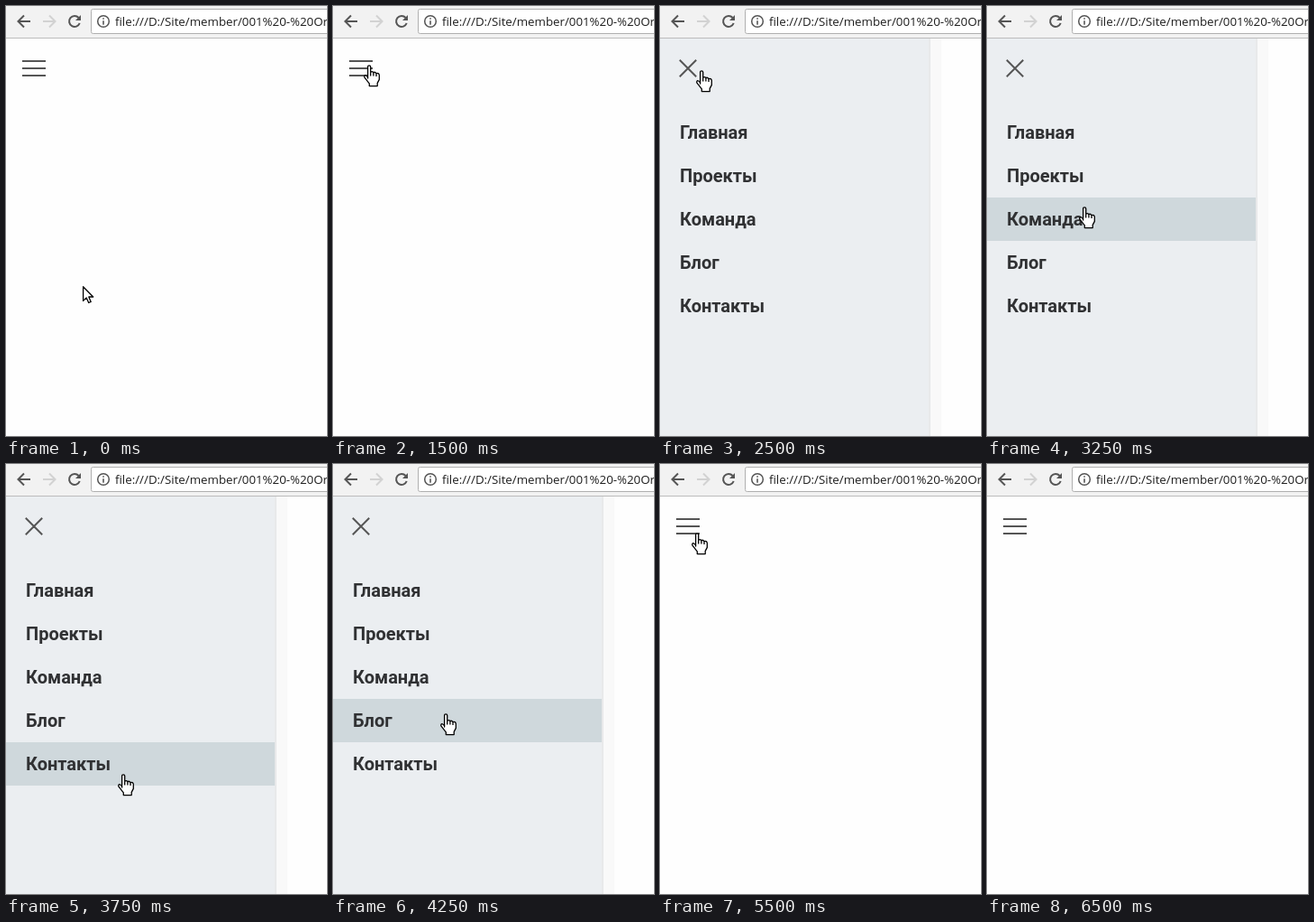
Animation, 356 px wide and 476 px high, one loop 6750 ms. Source, as an HTML page:

```html
<!DOCTYPE html>
<html lang="ru">
<head>
<meta charset="utf-8">
<title>Menu</title>
<style>
html, body { margin: 0; width: 100%; height: 100%; overflow: hidden; background: #fefefe; }
svg { display: block; width: 100vw; height: 100vh; }
.url { font: 13.3px "Open Sans", "Noto Sans", sans-serif; fill: #1e1e1e; }
.item { font: 700 20px Roboto, Arial, sans-serif; fill: #303133; }
.line { fill: none; stroke: #555; stroke-width: 2; }
.cursor { fill: #fff; stroke: #000; stroke-width: 1.3; stroke-linejoin: round; }
</style>
</head>
<body>
<svg viewBox="0 0 356 476">
  <rect width="356" height="476" fill="#fefefe"/>

  <g id="menu">
    <rect x="300" y="36" width="12" height="440" fill="#f9f9f9"/>
    <rect x="298" y="36" width="2" height="440" fill="#e8e9ea"/>
    <rect y="36" width="298" height="440" fill="#ebeef1"/>
    <rect id="hover" width="298" height="48" fill="#cfd8dc"/>
    <g id="items" class="item"></g>
    <path class="line" d="M21.8 59.8L40.2 78.2M40.2 59.8L21.8 78.2"/>
  </g>
  <path id="burger" class="line" d="M18 61H44M18 69H44M18 77H44"/>

  <rect width="356" height="36" fill="#f2f2f2"/>
  <path d="M0 35.5H356" stroke="#bcbcbc"/>
  <rect x="94.5" y="3.5" width="280" height="27" rx="2" fill="#fff" stroke="#b0b0b0"/>
  <path class="line" d="M27 17H14M20 10.5L13.5 17L20 23.5"/>
  <path class="line" style="stroke:#d2d2d2" d="M41 17H54M48 10.5L54.5 17L48 23.5"/>
  <path class="line" d="M80.6 13A6 6 0 1 0 81.7 19"/>
  <path d="M83 10V16H77Z" fill="#555"/>
  <circle class="line" cx="108" cy="17" r="6.3" style="stroke-width:1.5"/>
  <path class="line" style="stroke-width:1.6" d="M108 13.2V14.8M108 16.2V20.8"/>
  <text class="url" x="121" y="22">file:///D:/Site/member/001%20-%20Or</text>

  <path id="arrow" class="cursor" d="M.6 .8V16.4L4.2 13L6.7 18.5L9.2 17.4L6.8 12H11.7Z"/>
  <g id="hand" class="cursor">
    <path d="M4.6 15V2.2Q4.6 .8 6.1 .8Q7.7 .8 7.7 2.2V8.2Q9.4 6.8 10.9 8.6Q12.6 7.6 14 9.6Q16.6 8.8 17.3 11.4V16.4L15.2 20.4V23.6H6.3V20.8L1 14.2Q.2 12.2 1.8 11.7Q3 11.6 4.6 14Z"/>
    <path d="M7.7 8.2V12.4M10.9 8.6V12.6M14 9.6V13" fill="none"/>
  </g>
</svg>
<script>
const LOOP = 6750, ROW = 48, ROW_TOP = 116;
const OPEN = 1750, CLOSE = 5500;
const $ = id => document.getElementById(id);

// start time, cursor, x, y, hovered row
const steps = [
  [0, 'arrow', 85, 310],
  [250, 'arrow', 76, 274],
  [500, 'arrow', 73, 265],
  [750, 'arrow', 60, 176],
  [1000, 'arrow', 51, 95],
  [1250, 'hand', 37, 70],
  [1500, 'hand', 34, 65],
  [2500, 'hand', 40, 71],
  [2750, 'arrow', 54, 94],
  [3000, 'hand', 80, 158, 0],
  [3250, 'hand', 102, 222, 2],
  [3500, 'hand', 115, 285, 3],
  [3750, 'hand', 124, 343, 4],
  [4250, 'hand', 119, 276, 3],
  [4500, 'hand', 95, 204, 1],
  [4750, 'hand', 63, 137, 0],
  [5000, 'arrow', 53, 91],
  [5250, 'hand', 35, 76],
  [6000, 'arrow', 55, 112],
  [6250, 'arrow', 179, 440],
  [6500, '']
];

$('items').innerHTML = ['Главная', 'Проекты', 'Команда', 'Блог', 'Контакты']
  .map((label, i) => `<text x="22" y="${ROW_TOP + i * ROW + 31}">${label}</text>`).join('');

function show(id, on) {
  $(id).setAttribute('visibility', on ? 'inherit' : 'hidden');
}

function render(t) {
  const open = t >= OPEN && t < CLOSE;
  const [, cursor, x, y, row] = steps.findLast(s => s[0] <= t);
  show('menu', open);
  show('burger', !open);
  show('hover', row !== undefined);
  if (row !== undefined) $('hover').setAttribute('y', ROW_TOP + row * ROW);
  for (const id of ['arrow', 'hand']) {
    show(id, id === cursor);
    if (id === cursor) $(id).setAttribute('transform', `translate(${x} ${y})`);
  }
}

function tick() {
  render(performance.now() % LOOP);
  requestAnimationFrame(tick);
}
tick();
</script>
</body>
</html>
```
